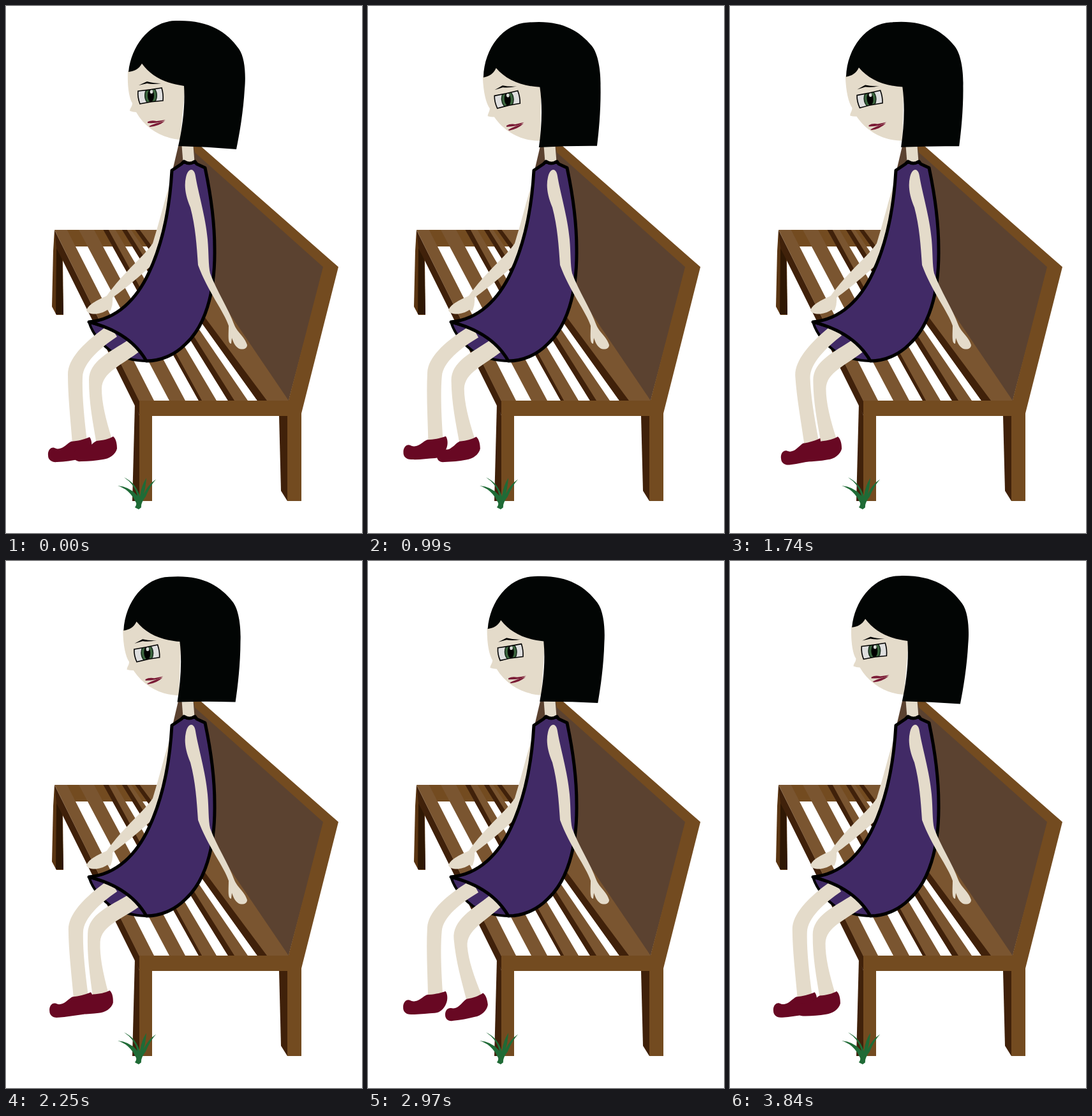
Animation of 558 by 824 pixels, one loop 3870 ms. Source, as an HTML page:

```html
<!DOCTYPE html>
<html lang="en">
<head>
<meta charset="utf-8">
<title>Girl on a bench</title>
<style>
  html, body { margin: 0; width: 100%; height: 100%; overflow: hidden; background: #fff; }
  svg { display: block; width: 100vw; height: 100vh; }
  .wood { fill: #734b20; }
  .slat { fill: #7a5530; }
  .dark { fill: #40210a; }
  .open { fill: #fff; }
  .skin { fill: #e4dbca; }
  .shoe { fill: #680823; }
  .dress { fill: #412a66; stroke: #000; stroke-width: 5; stroke-linejoin: round; }
  .lips { fill: #7a1a35; }
</style>
</head>
<body>
<svg viewBox="0 0 558 824">
  <defs>
    <clipPath id="lids"><path id="eye" d="M207 133Q227 131 244 128Q247 138 246 148Q228 149 210 153Q206 143 207 133Z"/></clipPath>
  </defs>

  <g id="bench">
    <path fill="#5a3512" d="M76 350L74 383L72 470L79 483H90L89 397Z"/>
    <path fill="#2f1804" d="M79 378L78 482H90L88 395Z"/>
    <path class="dark" d="M76 350L209 617V640L202 625L79 378Z"/>
    <path class="slat" d="M76 350H310L444 618H209Z"/>
    <g id="slats"></g>
    <path fill="#5b4230" d="M270 219H300L499 406L443 617L258 345V270Z"/>
    <path class="wood" d="M294 219H305L521 408L463 637V640H440L443 616L497 408L296 229Z"/>
    <path class="dark" d="M202 622L209 640V774H198Z"/>
    <path class="dark" d="M428 640H441V774L431 758Z"/>
    <path class="wood" d="M209 617H463V774H441V641H229V774H209Z"/>
  </g>

  <path fill="#1f6b36" d="M202 784Q206 779 203 775Q194 756 175 750Q195 752 206 766Q202 748 185 737Q204 746 210 767Q212 750 220 738Q219 752 216 763Q222 749 235 740Q225 752 219 767Q211 777 212 784L208 787Z"/>

  <path class="skin" d="M262 270C252 285 246 320 230 371C217 391 185 415 158 453C146 459 130 465 126 476C130 484 148 483 159 475Q161 478 164 476Q168 466 167 456C190 440 222 412 245 390Z"/>
  <path class="skin" d="M275 212L278 250H296L293 212Z"/>

  <path class="dress" style="stroke-width:4" d="M130 494Q138 520 165 540Q190 555 222 555L200 515Z"/>

  <g id="farLeg">
    <path class="skin" d="M162 498C130 520 97 548 97 576C97 610 101 645 104 684L127 680C122 640 119 605 120 580C121 558 147 535 174 517Z"/>
    <path class="shoe" d="M131 674C135 679 135 688 133 693C130 702 124 708 116 709C104 710 92 713 80 713C71 714 66 709 66 703C65 694 71 689 76 691C79 692 80 693 84 692C91 691 96 684 102 681C113 680 121 678 131 674Z"/>
  </g>
  <g id="nearLeg">
    <path class="skin" d="M192 522C163 541 130 555 130 585C130 620 136 650 142 685L166 677C156 645 150 620 150 598C151 572 180 563 212 538Z"/>
    <path class="shoe" d="M168 673C173 677 174 686 174 692C172 701 162 708 152 709C140 711 130 712 118 712C110 713 106 708 106 703C106 694 112 691 116 692C120 693 124 693 127 691C134 687 137 682 142 680C153 679 161 677 168 673Z"/>
  </g>

  <path class="dress" d="M260 257L275 247L279 243Q287 249 296 243L299 247L312 253C322 300 327 340 327 380C328 451 311 502 281 529C264 546 242 555 220 555C204 527 174 505 130 494C174 490 205 458 224 417C247 368 257 312 260 257Z"/>
  <path class="skin" d="M282 268C285 253 295 252 297 266C301 291 313 330 316 365C318 387 317 405 320 418C330 445 349 474 358 499C363 511 374 517 378 530C378 537 369 538 364 535C358 531 356 524 354 519L353 528C347 528 349 513 349 500C342 478 316 446 301 405C299 375 297 345 289 315C281 296 279 281 282 268Z"/>

  <g id="head">
    <path class="skin" d="M191 102C190 126 193 144 198 152C198 157 194 160 194 164Q199 166 204 166C219 192 245 207 273 209L281 124L213 88Z"/>
    <path fill="#020504" d="M192 103C197 57 230 22 268 23C318 22 346 40 365 67C375 81 376 110 374 130C372 165 366 200 361 224Q315 220 270 219C277 188 281 155 279 125C248 121 227 109 213 90C208 99 201 102 192 103Z"/>
    <path d="M208 124L221 118Q231 121 243 121Q231 123 221 121Z"/>
    <use href="#eye" fill="#dedede"/>
    <g clip-path="url(#lids)">
      <ellipse cx="227" cy="140" rx="10" ry="14" fill="#15281a"/>
      <ellipse cx="227" cy="140" rx="8.5" ry="13" fill="#3c663f"/>
      <ellipse cx="227" cy="140" rx="5" ry="10"/>
      <ellipse cx="228" cy="134" rx="2.4" ry="3" fill="#d8dcd8"/>
    </g>
    <use href="#eye" fill="none" stroke="#000" stroke-width="1.6"/>
    <path class="lips" d="M222 181Q228 178 236 180Q244 179 250 178Q241 184 222 183Z"/>
    <path class="lips" d="M224 188Q234 183 249 180Q239 188 226 189Z"/>
  </g>
</svg>
<script>
  const LOOP = 3870, STEP = 30;
  const BACK = 350, RAIL = 376, FRONT = 617;
  const $ = id => document.getElementById(id);

  // A strip of the seat between two lines, each given by its x at the rail and at the front
  function strip(cls, [a, c], [b, d], top) {
    const x = (from, to) => from + (to - from) * (top - RAIL) / (FRONT - RAIL);
    return `<path class="${cls}" d="M${x(a, c)} ${top}H${x(b, d)}L${d} ${FRONT}H${c}Z"/>`;
  }

  // Each opening ends at the dark side of the next slat
  function opening(i) {
    const right = [128 + 43 * i - 4 * i * i, 256 + 46 * i];
    const left = [right[0] - 19 + 4 * i, right[1] - 24 + 3 * i];
    const side = [right[0] + (i && 8), right[1] + 5 * i];
    return strip('wood', left, right, BACK) + strip('open', left, right, RAIL) + strip('dark', right, side, BACK);
  }
  $('slats').innerHTML = [0, 1, 2, 3].map(opening).join('');

  // Key poses: [time in ms, degrees]
  const nod = [[0, 0], [1000, -4.6], [1480, -4.6], [2970, -1.75], [LOOP, -.3]];
  const farSwing = [[0, 0], [460, -2.4], [925, 3.6], [1845, -4.9], [2710, 4.2], [LOOP, -.7]];
  const nearSwing = [[0, 0], [460, 1.5], [1385, -2.3], [2270, 2.4], [3000, -5.4], [LOOP, .6]];

  function at(keys, t) {
    const i = keys.findIndex(k => k[0] > t);
    const [t0, v0] = keys[i - 1], [t1, v1] = keys[i];
    return v0 + (v1 - v0) * (t - t0) / (t1 - t0);
  }

  function draw() {
    const t = Math.floor(performance.now() % LOOP / STEP) * STEP;
    const turn = (id, keys, x, y) => $(id).setAttribute('transform', `rotate(${at(keys, t)} ${x} ${y})`);
    turn('head', nod, 295, 247);
    turn('farLeg', farSwing, 150, 500);
    turn('nearLeg', nearSwing, 203, 537);
    requestAnimationFrame(draw);
  }
  draw();
</script>
</body>
</html>
```
